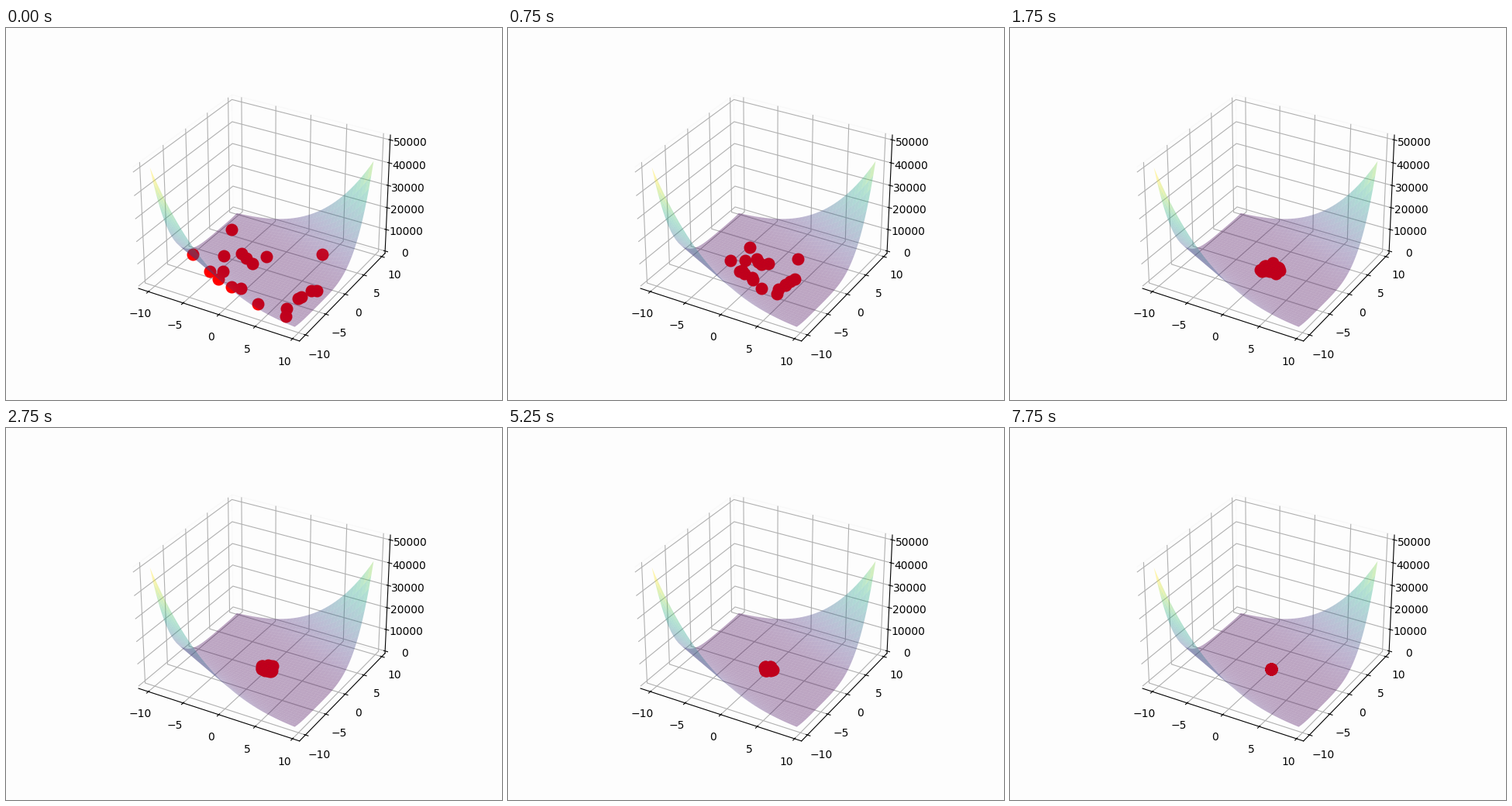
Recreate the animation shown at these times as a matplotlib script. Size 640 by 480 pixels, loop 8 s.

```python
import numpy as np
import matplotlib.pyplot as plt
from matplotlib.animation import FuncAnimation
from matplotlib.lines import Line2D

W, H, DPI = 640, 480, 100
FRAMES, STEP_MS = 32, 250
PAPER = "#fdfdfd"

GOAL = np.array([336, 310])
# Where the particles are dropped, in stage pixels.
START = np.array([
    (290, 259), (240, 291), (280, 293), (303, 290), (309, 296),
    (317, 303), (335, 294), (407, 291), (262, 313), (279, 313),
    (273, 323), (290, 333), (302, 335), (324, 355), (361, 361),
    (360, 371), (376, 348), (380, 346), (393, 338), (400, 338)])

rng = np.random.default_rng(4)
PHASE = rng.uniform(0, 2 * np.pi, START.shape)
SPEED = rng.uniform(0.6, 1.3, START.shape)
SWAY = np.array([9, 5])


def swarm(step):
    """Fall in towards the goal, then hover around it and settle."""
    pull = max(0, 1 - step / 8) ** 1.3
    settle = np.sqrt(1 - step / (FRAMES - 1)) * min(1, step / 8)
    hover = SWAY * settle * np.sin(PHASE + SPEED * step)
    return GOAL + (START - GOAL) * pull + hover


def zakharov(x, y):
    s = 0.5 * x + y
    return x**2 + y**2 + s**2 + s**4


fig = plt.figure(figsize=(W / DPI, H / DPI), dpi=DPI, facecolor=PAPER)
ax = fig.add_subplot(projection="3d", computed_zorder=False)
ax.set_facecolor(PAPER)
for axis in (ax.xaxis, ax.yaxis, ax.zaxis):
    axis.pane.set(facecolor=PAPER, edgecolor="#f5f5f5")

side = np.arange(-10, 10, 0.5)
X, Y = np.meshgrid(side, side)
ax.plot_surface(X, Y, zakharov(X, Y), cmap="viridis", alpha=0.35, zorder=3)

# The dots lie under the translucent surface.
dots = Line2D([], [], linestyle="none", marker="o", markersize=10,
              markeredgewidth=1.5, color="red", zorder=2,
              transform=fig.transFigure, clip_on=False)
ax.add_artist(dots)


def draw(step):
    x, y = swarm(step).T
    dots.set_data((x + 0.5) / W, 1 - (y + 0.5) / H)
    return dots,


anim = FuncAnimation(fig, draw, frames=FRAMES, interval=STEP_MS,
                     repeat=True, repeat_delay=0, blit=False)
plt.show()
```
